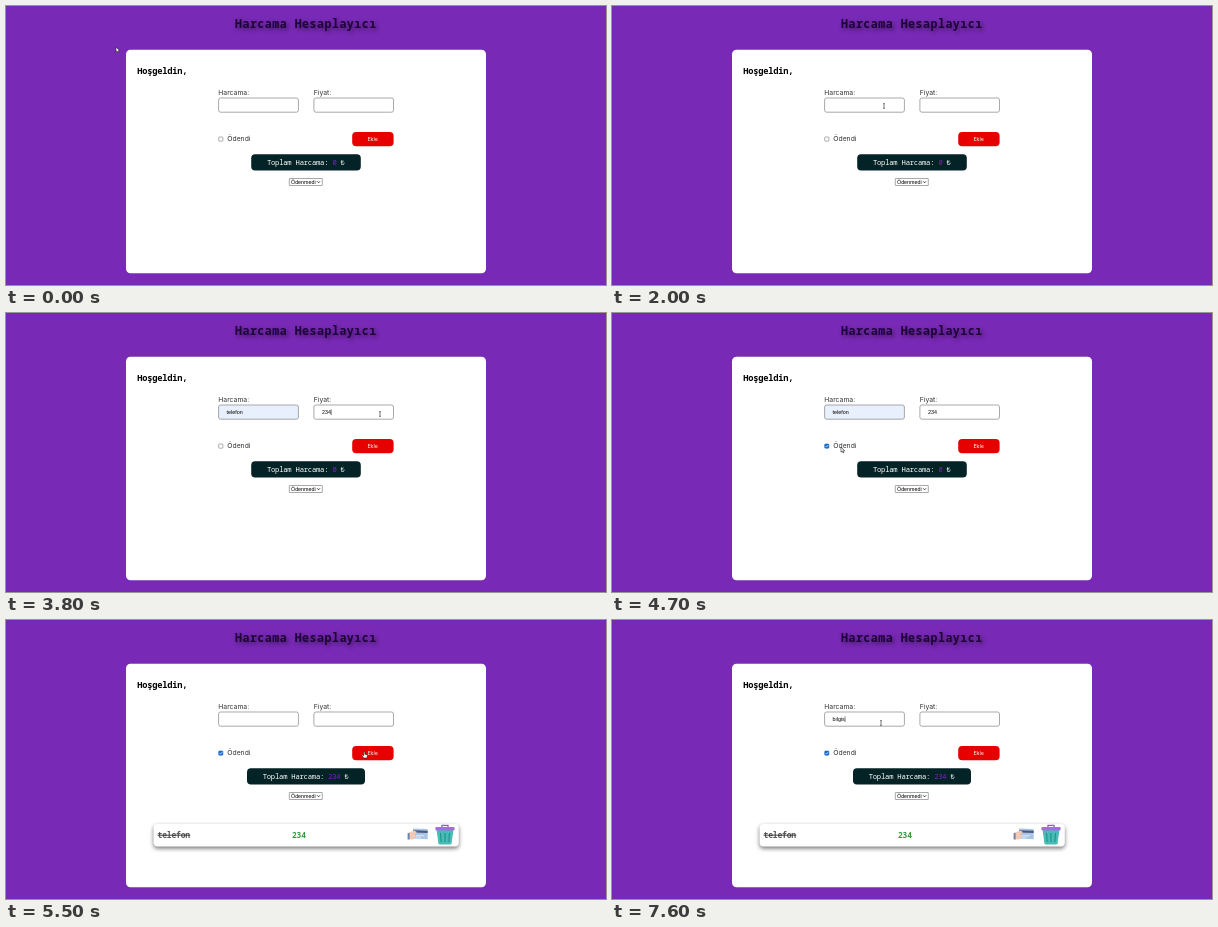
Recreate the animation shown at these times as an HTML page. Size 600 by 279 pixels, loop 8000 ms.

```html
<!DOCTYPE html>
<html lang="tr">
<head>
<meta charset="utf-8">
<style>
html, body { margin: 0; width: 100%; height: 100%; overflow: hidden; background: #7829b5; }
svg { display: block; width: 600px; height: 279px; }
text { white-space: pre; }
.mono { font-family: "Noto Sans Mono", "DejaVu Sans Mono", monospace; }
.bold { font-weight: 700; }
.title { font-size: 11.6px; letter-spacing: .5px; fill: #1d0338; filter: drop-shadow(2px 2px 2px #0007); }
.hello { font-size: 8.7px; letter-spacing: -.22px; }
.total { font-size: 7.2px; letter-spacing: -.22px; fill: #fff; }
.item { font-size: 8px; letter-spacing: -.16px; }
.label { font: 6.8px Inter, sans-serif; fill: #333; }
.button { font: 5.33px Inter, sans-serif; fill: #fff; }
.field { font: 5.33px "Liberation Sans", Arial, sans-serif; }
.box { fill: #fff; stroke: #858585; stroke-width: .7; }
.cursor { fill: #fff; stroke: #222; stroke-width: .6; stroke-linejoin: round; }
</style>
</head>
<body>
<svg viewBox="0 0 600 279">
  <text class="mono bold title" x="229" y="22">Harcama Hesaplayıcı</text>
  <rect x="120" y="43.7" width="360" height="223.6" rx="4.5" fill="#fff"/>
  <text class="mono bold hello" x="131.3" y="68">Hoşgeldin,</text>

  <text class="label" x="212.3" y="88.5">Harcama:</text>
  <text class="label" x="307.8" y="88.5">Fiyat:</text>
  <rect id="nameBox" class="box" x="212.6" y="92" width="79.8" height="14.2" rx="2"/>
  <rect class="box" x="307.9" y="92" width="79.6" height="14.2" rx="2"/>
  <text id="name" class="field" x="220.6" y="101"/>
  <text id="price" class="field" x="316" y="101"/>
  <path id="caret" stroke="#000" stroke-width=".5"/>

  <rect id="check" x="212.7" y="131" width="4.2" height="4.2" rx=".8" stroke="#767676" stroke-width=".6"/>
  <path id="tick" d="M213.5 133.1l1 1 1.7-2" fill="none" stroke="#fff" stroke-width=".7"/>
  <text class="label" x="221.3" y="135.4">Ödendi</text>
  <rect x="346.2" y="126" width="41.4" height="14.2" rx="4" fill="#e60000"/>
  <text class="button" x="361.4" y="134.8">Ekle</text>

  <rect id="totalBox" y="148.2" height="16.4" rx="4" fill="#042326"/>
  <text id="totalText" class="mono total" y="158.9">Toplam Harcama: <tspan id="sum" fill="#7c22c4"/> ₺</text>

  <rect class="box" x="283.3" y="172.5" width="33" height="7" rx=".3"/>
  <text class="field" x="285" y="178">Ödenmedi</text>
  <path d="M311.2 175.3l1.4 1.5 1.4-1.5" fill="none" stroke="#111" stroke-width=".8"/>

  <g id="card">
    <rect x="147.6" y="204" width="305.2" height="22.6" rx="4" fill="#fff" style="filter:drop-shadow(0 2px 2px #0008)"/>
    <text class="mono bold item" x="151.5" y="217.8" fill="#555">telefon</text>
    <path d="M151.5 215.2h32.8" stroke="#333" stroke-width=".9"/>
    <text class="mono bold item" x="285.9" y="217.8" fill="#369b3c">234</text>
    <g>
      <path d="M407 208.6l14.6.4.2 10.2-14.8-.6z" fill="#a9c6e6"/>
      <path d="M407 210.3l14.7.4v2.3l-14.7-.4z" fill="#4b5b80"/>
      <path d="M410 215.6h8M410 217.2h5" stroke="#eef5ff" stroke-width=".7"/>
      <path d="M402 213l6-2.4 3 1.5-2.4 2.3 2 1.8-3.6 3.4-5-.4z" fill="#f2c9b4"/>
      <path d="M401.6 213.3l2-.5v6.6h-2z" fill="#7182aa"/>
    </g>
    <g>
      <path d="M430.6 210h16.8l-1.8 13.2q-.2 1.4-1.8 1.4h-9.6q-1.6 0-1.8-1.4z" fill="#46bcb4"/>
      <path d="M434.5 213l.7 9M439 213v9M443.5 213l-.7 9" stroke="#258e92" stroke-width="1.1"/>
      <path d="M436 207v-1.6h6v1.6" fill="none" stroke="#9258cc" stroke-width="1.3"/>
      <rect x="429.3" y="206.9" width="19.4" height="3.5" rx="1.4" fill="#a66be0"/>
    </g>
  </g>
  <path id="cursor" class="cursor"/>
</svg>
<script>
const LOOP = 8000, STEP = 100;
const el = Object.fromEntries([...document.querySelectorAll('[id]')].map(e => [e.id, e]));
const set = (e, attrs) => { for (const k in attrs) e.setAttribute(k, attrs[k]); };

// Pointer stops: time, x, y
const path = [
  [0, 110, 41], [800, 183.2, 79.8], [1300, 183.2, 79.8], [1600, 225, 201], [2000, 272, 100],
  [2600, 272, 100], [2900, 310.5, 107], [3200, 374, 101], [3900, 374, 101],
  [4300, 292, 166], [4600, 229, 134], [4800, 229, 134], [5400, 358.3, 132], [6400, 358.3, 132],
  [6900, 269, 103], [LOOP, 269, 103]
];
const nameKeys = [[0, ''], [2400, 't'], [2500, 'te'], [2600, 'tel'], [2700, 'telefon'], [5400, ''],
  [6900, 'b'], [7000, 'bi'], [7100, 'bil'], [7200, 'bilg'], [7400, 'bilgi'], [7600, 'bilgis']];
const priceKeys = [[0, ''], [3500, '2'], [3700, '23'], [3800, '234'], [5400, '']];

const shapes = {
  arrow: 'M0 0v5.2l1.2-1.1.8 1.8.9-.4-.8-1.7h1.6z',
  beam: 'M-1-2.5q1 0 1 .7 0-.7 1-.7M0-1.8v3.6M-1 2.5q1 0 1-.7 0 .7 1 .7',
  hand: 'M-.6 0q.6-.7 1.2 0v2.2l2.2.6q.5.2.4.8l-.6 2.4h-3.2l-1.8-2.4q0-.8.8-.5l1 .7z'
};

const latest = (keys, t) => keys.findLast(k => k[0] <= t)[1];

function pointer(t) {
  const i = path.findLastIndex(p => p[0] <= t);
  const [t0, x0, y0] = path[i], [t1, x1, y1] = path[i + 1];
  const u = (t - t0) / (t1 - t0), e = u * u * (3 - 2 * u);
  return [x0 + (x1 - x0) * e, y0 + (y1 - y0) * e];
}

function shapeAt(x, y) {
  if (y > 92 && y < 106 && (x > 212 && x < 292 || x > 308 && x < 388)) return 'beam';
  return x > 346 && x < 388 && y > 126 && y < 140 ? 'hand' : 'arrow';
}

function draw(t) {
  const name = latest(nameKeys, t), price = latest(priceKeys, t);
  const checked = t >= 4600, added = t >= 5400;
  el.name.textContent = name;
  el.price.textContent = price;
  el.nameBox.style.fill = name === 'telefon' ? '#e8f0fe' : '#fff';

  const inName = t >= 2400 && t < 3300 || t >= 6900;
  const inPrice = t >= 3300 && t < 4000;
  const field = inName ? el.name : el.price;
  const caretX = (inName ? 220.6 : 316) + field.getComputedTextLength() + .3;
  set(el.caret, { d: inName || inPrice ? `M${caretX} 96.3v5.8` : '' });

  el.check.style.fill = checked ? '#1769d2' : '#fff';
  el.check.style.stroke = checked ? '#1769d2' : '#767676';
  el.tick.style.display = checked ? '' : 'none';
  el.card.style.display = added ? '' : 'none';
  el.sum.textContent = added ? '234' : '0';
  set(el.totalBox, added ? { x: 241, width: 118 } : { x: 245.2, width: 109.6 });
  set(el.totalText, { x: added ? 256.7 : 260.9 });

  const [x, y] = pointer(t);
  set(el.cursor, { d: shapes[shapeAt(x, y)], transform: `translate(${x} ${y})` });
  el.cursor.style.fill = shapeAt(x, y) === 'beam' ? 'none' : '#fff';
}

function frame() {
  draw(Math.floor(performance.now() % LOOP / STEP) * STEP);
  requestAnimationFrame(frame);
}
frame();
</script>
</body>
</html>
```
